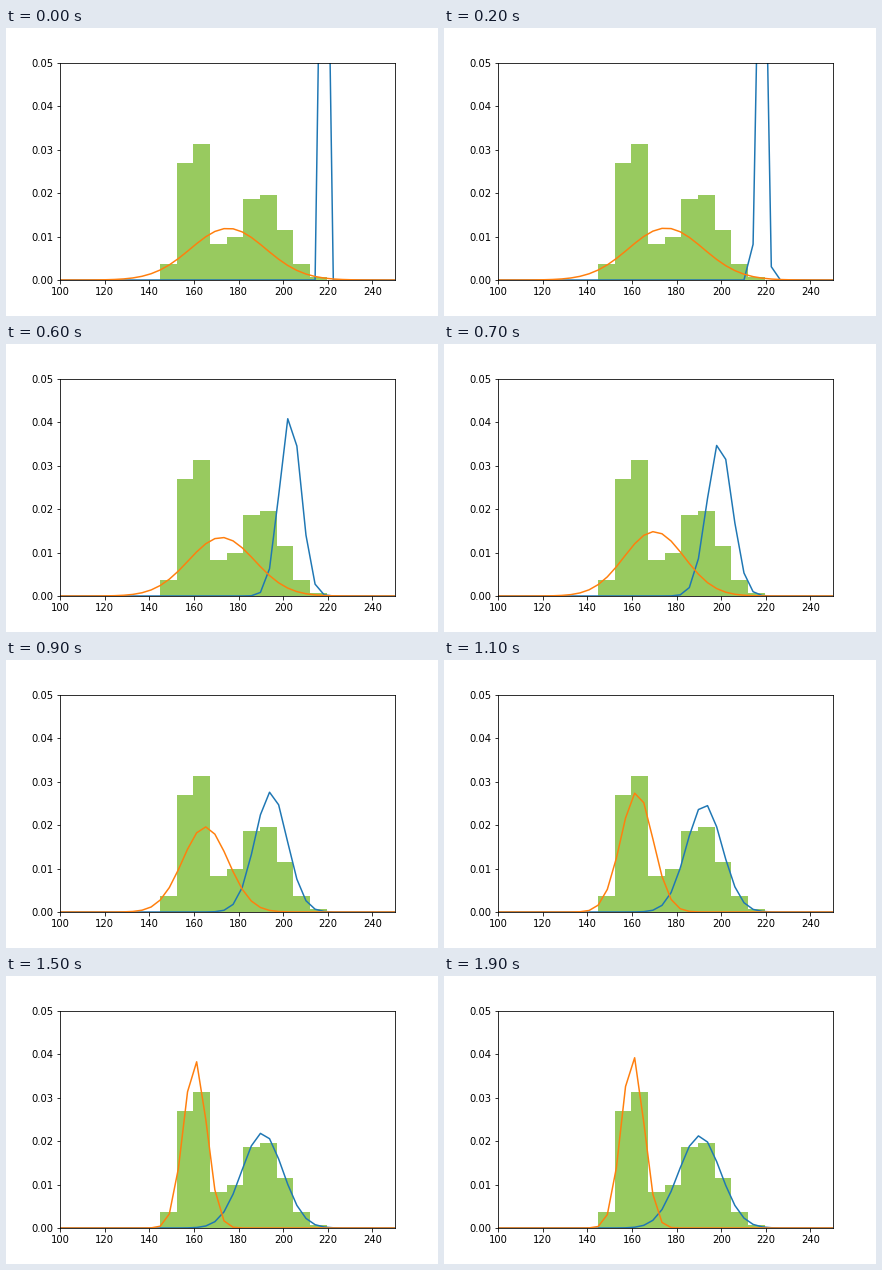
These frames come from a looping animation (432 by 288 pixels, 2 s). A matplotlib script:

```python
import math

import numpy as np
import matplotlib.pyplot as plt
from matplotlib.animation import FuncAnimation

FRAMES, INTERVAL = 20, 100
GROUP = 500                                # samples per component
LOW, HIGH = (160.3, 5.0), (190.3, 9.45)    # mean and deviation of the data
START = (219.2, 0.725)                     # first guess of the blue curve


def normal(x, mean, dev):
    z = (x - mean) / dev
    return np.exp(-z * z / 2) / (dev * math.sqrt(2 * math.pi))


def make_data():
    """Evenly spaced quantiles of two normal distributions."""
    grid = np.linspace(-4, 4, 1601)
    cdf = [(1 + math.erf(g / math.sqrt(2))) / 2 for g in grid]
    z = np.interp((np.arange(GROUP) + 0.5) / GROUP, cdf, grid)
    return np.concatenate([mean + dev * z for mean, dev in (LOW, HIGH)])


def weighted_fit(data, weight):
    mean = np.average(data, weights=weight)
    return mean, math.sqrt(np.average((data - mean) ** 2, weights=weight))


def fit_steps(data, count):
    """Expectation-maximisation with equal, fixed mixture weights."""
    orange, blue = (data.mean(), data.std()), START
    steps = [(orange, blue)]
    while len(steps) < count:
        a, b = normal(data, *orange), normal(data, *blue)
        share = b / (a + b)
        orange = weighted_fit(data, 1 - share)
        blue = weighted_fit(data, share)
        steps.append((orange, blue))
    return steps


data = make_data()
steps = fit_steps(data, FRAMES)
x = np.linspace(100, 300, 50)

fig = plt.figure(figsize=(6, 4), dpi=72, facecolor="white")
ax = fig.add_axes([0.125, 0.125, 0.775, 0.755])
ax.set_xlim(100, 250)
ax.set_ylim(0, 0.05)
ax.set_xticks(range(100, 250, 20))

ax.hist(data, bins=10, density=True, color="#98ca5f")
blue_line, = ax.plot([], [], color="tab:blue", lw=1.5)
orange_line, = ax.plot([], [], color="tab:orange", lw=1.5)


def draw(step):
    orange, blue = steps[step]
    blue_line.set_data(x, normal(x, *blue) / 2)
    orange_line.set_data(x, normal(x, *orange) / 2)
    return blue_line, orange_line


anim = FuncAnimation(fig, draw, frames=FRAMES, interval=INTERVAL,
                     init_func=lambda: draw(0), repeat=True, repeat_delay=0)
plt.show()
```
